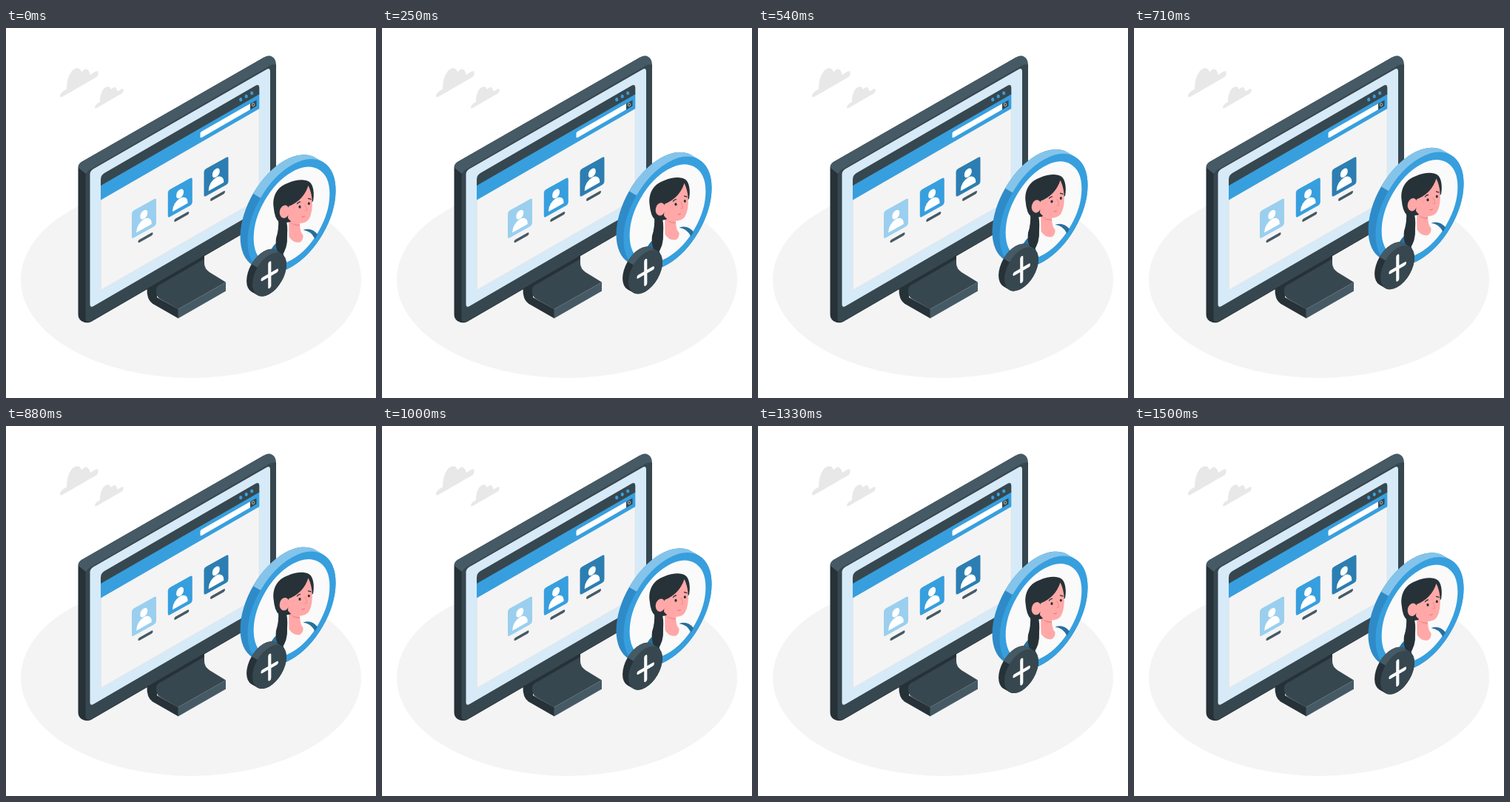
Recreate the animation shown at these times as an HTML page. Size 500x500 px, loop 1.54 s.

```html
<!DOCTYPE html>
<html lang="en">
<head>
<meta charset="utf-8">
<title>Add a contact</title>
<style>
  html, body { margin: 0; height: 100%; overflow: hidden; background: #fff; }
  svg { display: block; width: 100vw; height: 100vh; }
</style>
</head>
<body>
<svg viewBox="0 0 500 500">
  <defs>
    <path id="cloud" fill="#e8e8e8" d="M73 92Q73 87 82 82.500Q82 67 89 58Q98 50 102.500 59.500Q110 50 114 63L121 58.800Q125.500 57 124.500 62Q124 65 122 66.500L76 93Q73 94.500 73 92Z"/>
    <g id="card">
      <rect width="33" height="37" rx="3"/>
      <g fill="#fff">
        <ellipse cx="16.300" cy="13.300" rx="5" ry="5.700"/>
        <path d="M6.300 32v-1.500a10.200 11 0 0 1 20.400 0v1.500z"/>
      </g>
      <path d="M10.500 45.600h16" stroke="#455a64" stroke-width="4" stroke-linecap="round"/>
    </g>
  </defs>

  <ellipse cx="250" cy="340.100" rx="230" ry="132.800" fill="#f4f4f4"/>
  <use href="#cloud"/>
  <use href="#cloud" transform="translate(65.300 38.400) scale(.75)"/>

  <g id="stand">
    <path fill="#263238" d="M190.500 352L204 344V364L233 380V392.500L198 372.500Q190 367 190.500 352Z"/>
    <path fill="#37474f" d="M203 345L268 306V318Q268 325 275 330L297 343.500L232.500 380L208 366Q203 363 203 356Z"/>
    <path fill="#263238" d="M203 340L268 303V312L206 348Q203 350 203 355Z"/>
    <path fill="#455a64" d="M232.500 380L297 343.500V355.500L232.500 392.500Z"/>
  </g>

  <g id="monitor">
    <path fill="#263238" d="M97.500 189Q97.500 184 102 181L349 39.500L365 49V252L115 397Q109 400 102 396Q97.500 393 97.500 387Z"/>
    <path fill="#455a64" d="M98.500 185Q99.500 182.500 102 181L349 39.500Q355 36 360 39Q365 42 365 50L112 194Q110 195.500 109 198L98 189Z"/>
    <path fill="#37474f" d="M107.500 201Q107.500 195 113 191.500L356 51Q365 46 365 55V251L115 396Q107.500 400 107.500 391Z"/>
    <path fill="#d7eaf8" d="M113.500 198Q113.500 193 118 190.500L352 56Q357 53 357 59V232Q357 237 353 239.500L118 376Q113.500 378.500 113.500 373Z"/>
    <path fill="#f4f4f4" stroke="#dedede" stroke-width=".5" d="M128.300 232V354L342 231V109Z"/>
    <path fill="#379fde" d="M128 212V232.500L342.300 109V88Z"/>
    <path fill="#37474f" d="M128 213V205Q128 199 133 196L337 78Q342.300 75 342.300 81V89.500Z"/>
    <g fill="#379fde">
      <ellipse cx="317.200" cy="96.700" rx="2.100" ry="2.600"/>
      <ellipse cx="324.700" cy="92.400" rx="2.100" ry="2.600"/>
      <ellipse cx="332.200" cy="88" rx="2.100" ry="2.600"/>
    </g>
    <path fill="#fff" d="M262.500 142.500Q262.500 141 264 140L330 102.300V110.300L264.500 148Q262.500 149 262.500 147Z"/>
    <path fill="#37474f" d="M330 102.300L338.500 97.400V105.500L330 110.500Z"/>
    <ellipse cx="334" cy="103.600" rx="1.700" ry="2" fill="none" stroke="#d5d5d5" stroke-width=".8"/>
    <use href="#card" fill="#9bcfef" transform="matrix(1 -.56 0 1 170 248)"/>
    <use href="#card" fill="#379fde" transform="matrix(1 -.56 0 1 218.800 219.800)"/>
    <use href="#card" fill="#2c7eb2" transform="matrix(1 -.56 0 1 267.500 191.700)"/>
  </g>

  <g id="floating">
    <g transform="matrix(.866 -.5 0 1 386 254)">
      <path d="M0 0L-11.500-11.700" stroke="#2f8bc8" stroke-width="137.400" stroke-linecap="round"/>
      <path fill="#85c4ea" d="M-60.100-60.300A68.700 68.700 0 0 1 37.100-60.300L48.600-48.600H-48.600Z"/>
      <circle r="64" fill="#fafafa" stroke="#379fde" stroke-width="9.400"/>
    </g>

    <g id="woman">
      <path fill="#27709c" d="M356 304Q361 292 371 286L376 310L360 313ZM401.500 273Q413 269 421 279L417.500 285Q412 274 401.500 273Z"/>
      <path fill="#ffa8a7" d="M382 256L382.500 282Q388 291 397 289.500Q402 287 401.500 280Q397 276 397 263Z"/>
      <path fill="#f28f8f" d="M384 262Q390 266 397 265.500V267.500Q389 268 384 262Z"/>
      <path fill="#263238" d="M368 258Q372 256 378 258Q381 266 380 280Q381 298 372 308.500Q363 301 365 284Q369 272 368 258Z"/>
      <path fill="#263238" d="M361.500 241C360 225 368 214 381 209.500C393 204.500 404 204 410 208C415.500 212 417 224 415 234L408 240L384 262Q376 264 369 262Q363 258 361.500 241Z"/>
      <path fill="#ffa8a7" d="M382 241Q402 233 408.500 213Q412.500 221 413.500 231Q415 248 409.500 258Q406 264 395 264Q386 264 381 257Z"/>
      <ellipse cx="376.300" cy="248.200" rx="6.500" ry="8.800" fill="#ffa8a7" transform="rotate(12 376.300 248.200)"/>
      <g fill="#263238">
        <ellipse cx="397" cy="241.700" rx="1.600" ry="2"/>
        <ellipse cx="409.300" cy="237.200" rx="1.500" ry="1.900"/>
      </g>
      <g fill="none" stroke-linecap="round">
        <path stroke="#263238" stroke-width="1.300" d="M393.500 237.500Q395 235 397.500 235M408.500 230.500L412 231.500"/>
        <path stroke="#f28f8f" stroke-width="1.200" d="M404 238.500Q407 244 406.500 246.500L404 247"/>
        <path stroke="#e56a72" stroke-width="1" d="M400 255.200Q402 256 403.500 254.500"/>
      </g>
    </g>

    <g transform="matrix(.866 -.5 0 1 356 333)">
      <path d="M0 0L-9.200-9.200" stroke="#263238" stroke-width="53" stroke-linecap="round"/>
      <path fill="#455a64" d="M-27.900-27.900A26.500 26.500 0 0 1 9.500-27.900L18.700-18.700H-18.700Z"/>
      <circle r="26.500" fill="#37474f"/>
      <path d="M-11 .8H11.500M.3-15V16.500" stroke="#fafafa" stroke-width="4.800" stroke-linecap="round"/>
    </g>
  </g>
</svg>
<script>
  const LOOP = 1540, PERIOD = 1500, LEAD = 25, RISE = 10;
  const floating = document.getElementById('floating');

  // Linear rise and fall, 0 to 1 and back
  const triangle = t => 1 - Math.abs(1 - 2 * ((t / PERIOD) % 1));

  function draw(now) {
    const lift = RISE * (triangle(now % LOOP + LEAD) - triangle(LEAD));
    floating.setAttribute('transform', `translate(0 ${-lift})`);
    requestAnimationFrame(draw);
  }
  draw(performance.now());
</script>
</body>
</html>
```
